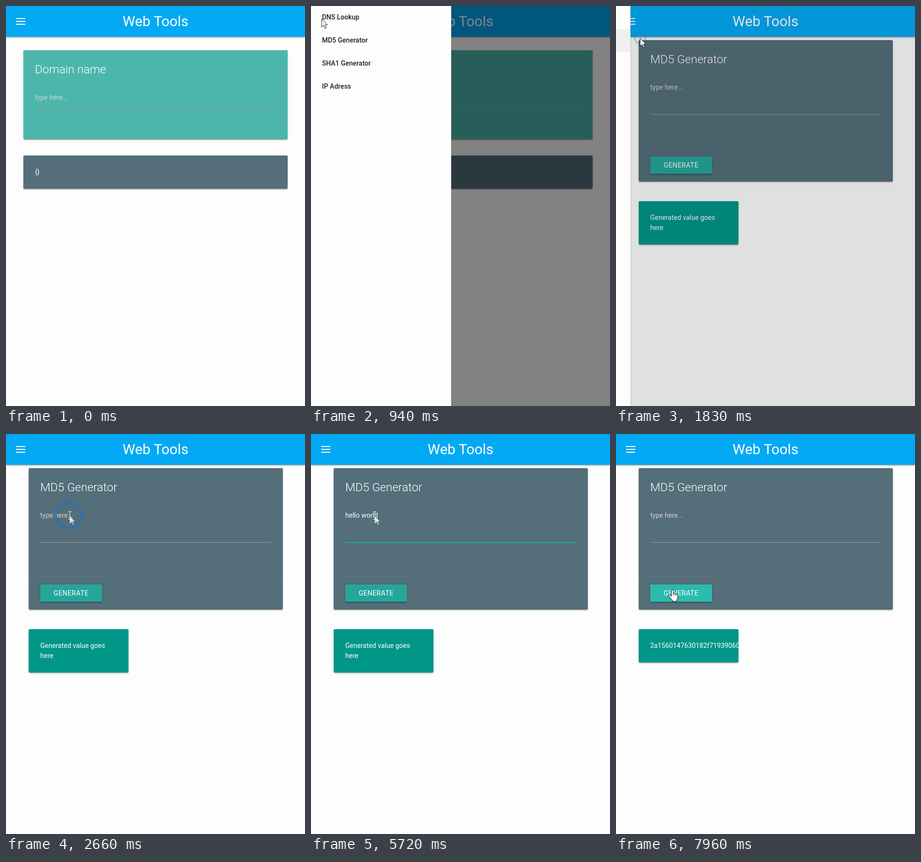
Write an HTML page that moves like this. It is 620 px wide and 832 px high and loops after 8000 ms.

```html
<!DOCTYPE html>
<html lang="en">
<head>
<meta charset="utf-8">
<title>Web Tools</title>
<style>
  html, body { margin: 0; width: 100%; height: 100%; overflow: hidden; }
  #stage {
    position: relative; width: 620px; height: 832px; overflow: hidden;
    font: 14px/21px Roboto, sans-serif; color: #fff; background: #fdfdfd;
    --focus: 0%; --hover: 0%;
  }
  #stage div, #stage span, #stage i, #stage svg { position: absolute; white-space: nowrap; }
  .card, #buttonShadow {
    border-radius: 2px;
    box-shadow: 0 2px 2px rgba(0, 0, 0, .14), 0 1px 5px rgba(0, 0, 0, .12), 0 3px 1px -2px rgba(0, 0, 0, .2);
  }
  .slate { background: #546e7a; }
  .title { font-size: 24px; font-weight: 300; line-height: 32px; }
  .hint { color: #d1d1d1; }
  .page, #shade { inset: 0; }
  #shade { background: #000; }
  #bar { left: 0; top: 0; width: 620px; height: 64px; background: #03a9f4;
    box-shadow: 0 2px 2px rgba(0, 0, 0, .14), 0 1px 5px rgba(0, 0, 0, .12), 0 3px 1px -2px rgba(0, 0, 0, .2); }
  #brand { left: 0; width: 620px; text-align: center; font-size: 29.4px; line-height: 64px; }
  #bar i { left: 21px; width: 19px; height: 2px; background: #fff; }
  #field { left: 24px; top: 154px; width: 479px; height: 2px;
    background: linear-gradient(color-mix(in srgb, #26a69a var(--focus), #9e9e9e) 50%,
      color-mix(in srgb, #26a69a var(--focus), transparent) 50%); }
  #button, #buttonShadow { left: 24px; top: 242px; width: 128px; height: 36px; border-radius: 2px; }
  #button { overflow: hidden; line-height: 36px; text-align: center; letter-spacing: .5px;
    background: color-mix(in srgb, #2bbbad var(--hover), #26a69a); }
  #button span { inset: 0; }
  #caret { top: 91px; width: 1px; height: 17px; background: #fff; }
  #nav { left: 0; top: 0; width: 300px; height: 832px; background: #fdfdfd;
    box-shadow: 0 2px 2px rgba(0, 0, 0, .14), 0 1px 5px rgba(0, 0, 0, .12); }
  #nav div { left: 0; width: 300px; height: 48px; padding-left: 32px; box-sizing: border-box;
    line-height: 47px; font-weight: 500; color: rgba(0, 0, 0, .87); }
  #nav .on { background: rgba(0, 0, 0, .05); }
  #overlay { left: 0; top: 0; }
</style>
</head>
<body>
<div id="stage">
  <div id="bar">
    <i style="top:25px"></i><i style="top:31px"></i><i style="top:37px"></i>
    <span id="brand">Web Tools</span>
  </div>

  <div class="page" id="home">
    <div class="card" style="left:36px;top:92px;width:548px;height:185px;background:#4db6ac">
      <span class="title" style="left:24px;top:24px">Domain name</span>
      <span class="hint" style="left:24px;top:88px">type here...</span>
      <div style="left:24px;top:120px;width:500px;height:1px;background:#9e9e9e"></div>
    </div>
    <div class="card slate" style="left:36px;top:311px;width:548px;height:69px">
      <span style="left:24px;top:24px">{}</span>
    </div>
  </div>

  <div class="page" id="md5">
    <div class="card slate" style="left:47px;top:71px;width:527px;height:294px">
      <span class="title" style="left:24px;top:24px">MD5 Generator</span>
      <span class="hint" id="hint" style="left:24px;top:88px">type here...</span>
      <span id="typed" style="left:24px;top:88px"></span>
      <div id="caret"></div>
      <div id="field"></div>
      <div style="left:0;top:225px;width:527px;height:1px;background:rgba(160,160,160,.2)"></div>
      <div id="buttonShadow"></div>
      <div id="button">
        <svg width="128" height="36" style="left:0;top:0"><circle id="ripple" cx="44" cy="11" fill="#fff"/></svg>
        <span>GENERATE</span>
      </div>
    </div>
    <div class="card" id="result" style="left:47px;top:406px;width:207px;background:#009688">
      <span id="value" style="left:24px;top:24px;white-space:pre"></span>
    </div>
  </div>

  <div id="shade"></div>
  <div id="nav">
    <div style="top:0">DNS Lookup</div>
    <div style="top:48px">MD5 Generator</div>
    <div style="top:96px">SHA1 Generator</div>
    <div style="top:144px">IP Adress</div>
  </div>

  <svg id="overlay" width="620" height="832">
    <circle id="ring" fill="none" stroke="#246ec8" stroke-width="4"/>
    <g id="pointer">
      <path id="arrow" d="M0 0V17L4 13.3 6.7 19.6 9.5 18.4 6.8 12.2H12Z" fill="#fff" stroke="#111" stroke-linejoin="round"/>
      <g id="beam">
        <path d="M1 1V18L5 14 8 20 10 19 7 13H12Z" fill="#e0e0e0" stroke="#546e7a" stroke-width=".6"/>
        <path d="M-2-7.5H1Q1.5-7.5 1.5-6.5Q1.5-7.5 2-7.5H5M1.5-7V8M-2 8.5H5" fill="none" stroke="#fff"/>
      </g>
      <g id="hand" stroke="#111" stroke-linejoin="round">
        <path d="M-1 2Q-1 0 1 0T3 2V8Q5 6 6.5 8 8.5 7 9.5 9 12 8 12 11V16Q12 19 10 21V24H1V22Q-2 19-4 16L-7 12Q-6 9-3 11L-1 14Z" fill="#fff"/>
        <path d="M3 7V12M6.5 8V12M9.5 9V12" fill="none"/>
      </g>
    </g>
  </svg>
</div>
<script>
const $ = id => document.getElementById(id);
const stage = $('stage'), rows = [...$('nav').children];
const LOOP = 8000, OPEN = 735, CLOSE = 1660, FOCUS = 2640, BLUR = 6870, RESULT = 6990;
const clicks = [[630, 22, 27], [1630, 50, 67], [FOCUS, 130, 169], [BLUR, 115, 324]];
const path = [[600, -12, 10], [630, 22, 27], [1000, 22, 27], [1390, 50, 67], [2110, 50, 67],
  [2600, 131, 169], [5910, 131, 169], [6360, 84, 262], [6710, 116, 324]];
const message = 'hello world';
const keyTimes = [3770, 3840, 3990, 4170, 4360, 4480, 4600, 4720, 4890, 5010, 5190];

const span = (t, start, length) => Math.min(1, Math.max(0, (t - start) / length));
const easeOut = p => 1 - (1 - p) ** 2;
const smooth = p => p * p * (3 - 2 * p);
const show = (id, on) => { $(id).style.display = on ? '' : 'none'; };
const setText = (id, text) => { if ($(id).textContent !== text) $(id).textContent = text; };
const percent = (name, p) => stage.style.setProperty(name, p * 100 + '%');

function pointerAt(t) {
  const next = path.findIndex(point => point[0] > t);
  if (next < 1) return (next ? path.at(-1) : path[0]).slice(1);
  const [t0, x0, y0] = path[next - 1], [t1, x1, y1] = path[next];
  const p = smooth((t - t0) / (t1 - t0));
  return [x0 + (x1 - x0) * p, y0 + (y1 - y0) * p];
}

function drawNav(t, y) {
  const closing = span(t, CLOSE, 250);
  const shift = easeOut(span(t, OPEN, 250)) - easeOut(closing);
  $('nav').style.transform = `translateX(${(shift - 1) * 300}px)`;
  show('nav', shift > 0);
  $('shade').style.opacity = .5 * (t < CLOSE ? shift : (1 - closing) ** 1.3);
  rows.forEach((row, i) => row.classList.toggle('on', t > 1020 && Math.floor(y / 48) === i));
}

function drawForm(t) {
  const done = t >= RESULT;
  const pressed = keyTimes.filter(k => k <= t);
  const count = done ? 0 : pressed.length;
  setText('typed', message.slice(0, count));
  show('hint', !count);
  percent('--focus', span(t, FOCUS + 20, 300) - span(t, BLUR, 300));

  const lastKey = Math.max(FOCUS + 30, ...pressed);
  show('caret', t >= FOCUS && t < BLUR && Math.floor((t - lastKey) / 520) % 2 === 0);
  $('caret').style.left = 24 + $('typed').offsetWidth + 'px';

  percent('--hover', span(t, 6600, 250));
  const wave = span(t, BLUR, 700);
  $('ripple').setAttribute('r', 130 * easeOut(wave));
  $('ripple').setAttribute('opacity', .6 * wave * (1 - wave));

  setText('value', done ? '2a1560147630182f71939060c2d5e8a4' : 'Generated value goes\nhere');
  $('result').style.height = done ? '69px' : '90px';
}

function drawPointer(t, x, y) {
  const inField = t > 2000 && y > 150 && y < 227 && x > 71;
  const onLink = t < 760 || (t > 6000 && y > 313);
  show('pointer', t >= 600);
  show('beam', inField);
  show('hand', onLink);
  show('arrow', !inField && !onLink);
  $('pointer').setAttribute('transform', `translate(${x} ${y})`);

  const click = clicks.find(c => t >= c[0] && t < c[0] + 300);
  show('ring', click);
  if (!click) return;
  const age = t - click[0];
  $('ring').setAttribute('cx', click[1]);
  $('ring').setAttribute('cy', click[2]);
  $('ring').setAttribute('r', 29 - age * .09);
  $('ring').setAttribute('opacity', .8 * (1 - age / 300));
}

const start = performance.now();
function draw() {
  const t = (performance.now() - start) % LOOP;
  const [x, y] = pointerAt(t);
  const md5 = t >= CLOSE;
  show('home', !md5);
  show('md5', md5);
  drawNav(t, y);
  drawForm(t);
  drawPointer(t, x, y);
  requestAnimationFrame(draw);
}
draw();
</script>
</body>
</html>
```
